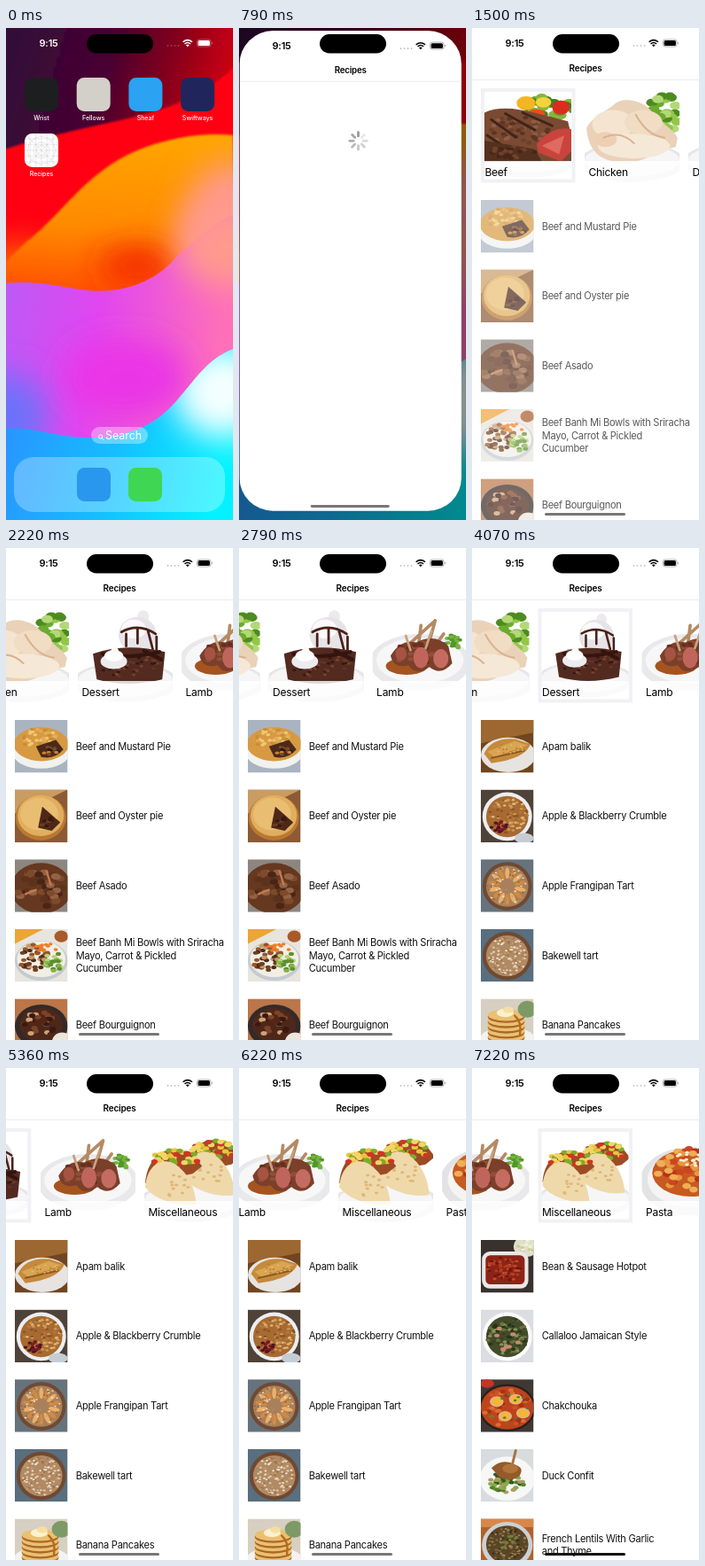
Write an HTML page that moves like this. It is 256 px wide and 555 px high and loops after 8 s.

```html
<!DOCTYPE html>
<html lang="en">
<head>
<meta charset="utf-8">
<title>Recipes</title>
<style>
html, body { margin: 0; height: 100%; overflow: hidden; background: #fff; }
svg { display: block; }
#stage { width: 100vw; height: 100vh; }
text { font-family: Inter, Roboto, sans-serif; }
.row { font-size: 11.07px; letter-spacing: -.27px; fill: #111; }
.cat { font-size: 12px; letter-spacing: -.26px; }
.app { font-size: 7px; font-weight: 500; fill: #fff; text-anchor: middle; }
</style>
</head>
<body>
<svg id="stage" viewBox="0 0 256 555" preserveAspectRatio="none">
  <defs>
    <linearGradient id="dark" x2="1" y2=".15"><stop stop-color="#2e0a3a"/><stop offset=".5" stop-color="#4a0430"/><stop offset=".75" stop-color="#86041c"/><stop offset="1" stop-color="#cc0410"/></linearGradient>
    <linearGradient id="flame" x1=".4" x2=".3" y2="1"><stop stop-color="#ffa400"/><stop offset=".55" stop-color="#ff8a00"/><stop offset="1" stop-color="#ff4800"/></linearGradient>
    <linearGradient id="violet" y2=".2"><stop stop-color="#b95cf6"/><stop offset=".45" stop-color="#e046f0"/><stop offset="1" stop-color="#ff70b8"/></linearGradient>
    <linearGradient id="ice" y1=".3" x2="1" y2=".5"><stop stop-color="#2a92ff"/><stop offset=".5" stop-color="#16bcff"/><stop offset="1" stop-color="#04f2ff"/></linearGradient>
    <filter id="soft" x="-100%" y="-100%" width="300%" height="300%"><feGaussianBlur stdDeviation="18"/></filter>
    <filter id="edge"><feGaussianBlur stdDeviation="1"/></filter>
    <clipPath id="clip"><rect id="win"/></clipPath>
    <clipPath id="shore"><path id="wave" d="M256 362C226 374 214 396 192 421C164 453 128 464 88 462C50 460 30 450 0 452V555H256Z"/></clipPath>
  </defs>
  <g id="wall">
    <path d="M0 0H256V555H0Z" fill="#ff0012"/>
    <path d="M-5-5H262V40C228 72 196 88 142 101C92 113 45 121-5 138Z" fill="url(#dark)" filter="url(#edge)"/>
    <ellipse cx="15" cy="275" rx="55" ry="30" fill="#ff6a00" filter="url(#soft)"/>
    <path d="M22 242C62 212 90 162 148 138C188 122 225 118 256 121V310H0V264Z" fill="url(#flame)" filter="url(#edge)"/>
    <ellipse cx="256" cy="225" rx="56" ry="75" fill="#ff9a8c" filter="url(#soft)"/>
    <ellipse cx="148" cy="268" rx="44" ry="20" fill="#f42400" filter="url(#soft)"/>
    <path d="M0 288C35 284 60 292 92 296C135 300 172 284 194 256C215 238 235 220 256 210V555H0Z" fill="url(#violet)"/>
    <ellipse cx="250" cy="245" rx="58" ry="48" fill="#ff9a8e" filter="url(#soft)"/>
    <ellipse cx="135" cy="395" rx="70" ry="45" fill="#ea34e6" filter="url(#soft)"/>
    <ellipse cx="0" cy="440" rx="45" ry="50" fill="#6a72fa" filter="url(#soft)"/>
    <use href="#wave" fill="url(#ice)"/>
    <g clip-path="url(#shore)"><ellipse cx="244" cy="410" rx="55" ry="52" fill="#f4ffff" filter="url(#soft)"/></g>
  </g>
  <rect id="dim" width="256" height="555"/>
  <g id="home"></g>
  <g clip-path="url(#clip)">
    <g id="app">
      <rect width="256" height="560" fill="#fff"/>
      <g id="lists"></g>
      <g id="cards"></g>
      <g id="spin"></g>
      <path d="M0 58.5H256" stroke="#e4e4e6" stroke-width=".7"/>
      <text x="128" y="48.7" text-anchor="middle" font-size="10" font-weight="600" letter-spacing="-.2">Recipes</text>
      <rect id="bar" x="82" y="547" width="91" height="3" rx="1.5"/>
    </g>
    <g id="icon"></g>
  </g>
  <rect x="91" y="7" width="75" height="21.5" rx="10.75"/>
  <g id="status">
    <text x="37.5" y="21" font-size="11" font-weight="600" letter-spacing="-.2">9:15</text>
    <path d="M182.5 20h.01m4 0h.01m4 0h.01m4 0h.01" stroke="currentColor" stroke-width="1.6" stroke-linecap="round" opacity=".35"/>
    <path d="M199.6 15.8q5.2-4.4 10.4 0M201.5 17.8q3.3-2.7 6.6 0" fill="none" stroke="currentColor" stroke-width="1.5"/>
    <path d="M202.9 19.2q1.9-1.4 3.8 0l-1.9 2z"/>
    <rect x="215.5" y="13" width="15.5" height="8" rx="2.5" fill="none" stroke="currentColor" stroke-width=".7" opacity=".45"/>
    <rect x="216.6" y="14.1" width="13.3" height="5.8" rx="1.5"/>
    <path d="M232 15.5q1.8 1.5 0 3z" opacity=".5"/>
  </g>
</svg>
<script>
const $ = id => document.getElementById(id);
const set = (el, attrs) => { for (const k in attrs) el.setAttribute(k, attrs[k]); };
const clamp = v => Math.max(0, Math.min(1, v));

// Drawing helpers; food pictures use a 100 x 100 box
let seed = 7;
const rnd = () => (seed = seed * 16807 % 2147483647) / 2147483647;
const E = (x, y, rx, ry, f) => `<ellipse cx="${x}" cy="${y}" rx="${rx}" ry="${ry}" fill="${f}"/>`;
const R = (x, y, w, h, f, r = 0) => `<rect x="${x}" y="${y}" width="${w}" height="${h}" rx="${r}" fill="${f}"/>`;
const P = (d, f) => `<path d="${d}" fill="${f}"/>`;
const S = (d, c, w) => `<path d="${d}" fill="none" stroke="${c}" stroke-width="${w}" stroke-linecap="round"/>`;
const bg = f => R(0, 0, 100, 100, f);
const bits = (n, x, y, rx, ry, size, ...cols) => {
  let s = '';
  for (let i = 0; i < n; i++) {
    const a = rnd() * 6.283, d = Math.sqrt(rnd());
    s += E((x + rx * d * Math.cos(a)).toFixed(1), (y + ry * d * Math.sin(a)).toFixed(1), size, size * .7, cols[i % cols.length]);
  }
  return s;
};
const pic = (art, x, y, w) => `<svg x="${x}" y="${y}" width="${w}" height="${w}" viewBox="0 0 100 100">${art}</svg>`;

const plate = E(50, 78, 56, 21, '#e6e6e8') + E(50, 76, 50, 17, '#f6f6f7');
const taco = (x, y) => `<g transform="translate(${x} ${y})">` +
  P('M0 40C2 8 30-6 52 12L60 22L50 30Z', '#9c4b24') + bits(40, 32, 15, 25, 10, 3.5, '#e8c53c', '#7faa2e', '#cf3526', '#f0d668') +
  P('M0 44C2 18 20 12 32 20C46 30 52 44 54 62C38 66 10 58 0 44Z', '#efd9ab') + bits(12, 28, 43, 19, 14, 2, '#ddb878') + '</g>';

const cats = [
  ['Beef', bg('#fff') + plate + bits(24, 70, 20, 34, 14, 7, '#5d9a2c', '#3f7d22', '#86b53c') +
    E(48, 13, 11, 8, '#f5b422') + E(68, 12, 9, 6, '#f6d23c') + E(88, 18, 10, 8, '#dc2c20') + E(60, 25, 10, 5, '#e8501e') +
    P('M0 24C25 12 60 25 96 34L100 50V80H0Z', '#7a4a32') + bits(50, 38, 44, 36, 16, 3, '#8f5d43', '#5d3422', '#6d3f2a') +
    S('M8 32L36 52M24 25L58 44M44 24L78 39M3 50L24 64', '#40241a', 3) +
    P('M0 56L58 66L66 80H0Z', '#54301f') + bits(24, 30, 70, 28, 7, 3, '#6f422c', '#472619') +
    P('M60 60C72 45 88 40 100 43V68L88 80L62 70Z', '#c8443c') + P('M66 62L92 50L86 72Z', '#e06a60')],
  ['Chicken', bg('#fff') + plate + bits(30, 84, 27, 17, 20, 6, '#6cab2d', '#92c748', '#4d8b20', '#b4d878') +
    P('M2 42C8 30 20 26 30 18C40 8 62 12 72 26C82 38 92 42 98 52L96 62C70 66 70 78 42 78C16 78 4 66 2 42Z', '#e9d2b8') +
    E(30, 38, 22, 15, '#f4e4d0') + E(62, 36, 20, 13, '#f1dcc4') + E(52, 61, 38, 13, '#f6e8d6') + E(22, 54, 12, 8, '#efcfb4') +
    S('M20 52Q38 44 52 58M54 28Q66 50 84 52', '#dab491', 2)],
  ['Dessert', bg('#fff') + plate + E(69, 9, 6, 7, '#eceaec') + E(63, 28, 20, 19, '#e6e4e8') + E(59, 22, 13, 10, '#fafafa') +
    S('M46 25Q64 15 82 27M51 27V40M63 22V37M74 24L79 43M83 30V49', '#4a2118', 2.6) +
    P('M16 48Q50 36 92 46L89 75Q52 84 20 75Z', '#532a20') + bits(46, 55, 61, 33, 12, 2, '#74432f', '#361813', '#633525') +
    S('M26 48Q52 54 86 46M70 45L88 54', '#35140f', 4) + E(38, 56, 14, 8, '#ecebee') + E(38, 50, 10, 6, '#fff') + E(39, 45, 4, 4, '#fafafa')],
  ['Lamb', bg('#fff') + E(50, 57, 53, 30, '#e9e9ec') + E(50, 55, 46, 24, '#f7f7f8') + E(36, 61, 22, 9, '#a5541f') +
    bits(26, 84, 36, 9, 8, 2.6, '#4f9828', '#78b242') + S('M36 40L66 13M48 43L51 18M59 38L66 13M66 39L75 27', '#b48a62', 3.4) +
    P('M19 50Q30 32 46 36Q66 26 80 40L84 58Q72 72 60 62Q46 72 38 60Q22 64 19 50Z', '#7b3f2a') + bits(24, 50, 48, 28, 12, 3, '#8f5038', '#663020') +
    E(51, 52, 8, 11, '#c0655c') + E(72, 53, 8, 10, '#c46c62') + E(30, 48, 6, 7, '#a55343') + S('M40 44L35 29M56 42L62 24', '#c8a27d', 2.6)],
  ['Miscellaneous', bg('#fff') + plate + taco(42, 8) + taco(1, 18)],
  ['Pasta', bg('#fff') + E(52, 56, 54, 36, '#e3e3e6') + E(52, 54, 46, 29, '#f5f4f3') + E(52, 47, 41, 25, '#c65a20') +
    bits(60, 52, 43, 36, 22, 4.5, '#e9983f', '#cc4520', '#efae58', '#b93118') + bits(16, 50, 32, 17, 8, 2, '#fff1d8')],
];

const dish = (back, rim, fill) => bg(back) + E(50, 51, 47, 46, rim) + E(50, 51, 40, 39, fill);
const slices = () => {
  let s = '';
  for (let i = 0; i < 14; i++) s += `<g transform="rotate(${i * 25.7} 50 51)">${E(50, 26, 4, 11, i % 2 ? '#d08a42' : '#ebb068')}</g>`;
  return s;
};
const lists = [
  [
    ['Beef and Mustard Pie', bg('#a9b4c0') + E(50, 62, 54, 30, '#f1f1ef') + E(50, 46, 52, 32, '#d79a42') + bits(46, 46, 36, 38, 20, 4, '#f0c771', '#e3ad57', '#c98d38') + P('M40 50L78 38L92 56Q75 76 50 70Z', '#4b2a1a') + bits(16, 68, 58, 16, 9, 4, '#7b4a2a', '#c9842f', '#2f1a12')],
    ['Beef and Oyster pie', bg('#8c5a34') + P('M0 0H100L75 12L0 45Z', '#c99c63') + E(49, 53, 48, 43, '#b97932') + E(49, 49, 44, 39, '#e0ae5e') + E(46, 46, 36, 31, '#e9bd72') + P('M52 32L86 62L70 78L44 72Z', '#4d2819') + bits(12, 62, 62, 14, 10, 4, '#6b3b22', '#38190f')],
    ['Beef Asado', bg('#8d8680') + E(50, 55, 58, 48, '#65381f') + bits(40, 50, 54, 46, 36, 8, '#4a2415', '#7d4b2b', '#5c321d', '#936243') + S('M60 22L68 48M20 66L40 58', '#c27a50', 4)],
    ['Beef Banh Mi Bowls with Sriracha|Mayo, Carrot & Pickled|Cucumber', bg('#e8e4de') + P('M0 0H55L0 28Z', '#eda439') + E(50, 60, 50, 38, '#c5cad0') + E(50, 57, 46, 34, '#f1eee6') + bits(50, 36, 54, 28, 26, 5, '#70401f', '#965529', '#4e2b17', '#c79a6c') + bits(24, 74, 62, 18, 18, 5, '#83b244', '#b7d477', '#5d8f30') + bits(12, 60, 36, 21, 8, 4, '#ee7c26') + E(88, 14, 13, 11, '#a85a28')],
    ['Beef Bourguignon', bg('#bb7649') + E(50, 52, 50, 41, '#332a28') + E(50, 50, 41, 32, '#4d281a') + bits(32, 48, 48, 32, 25, 6, '#7b4328', '#cba47b', '#552515', '#3a1a10') + E(90, 83, 20, 19, '#ece6dd')],
  ],
  [
    ['Apam balik', bg('#70451f') + P('M0 0H100V24L0 44Z', '#9c6730') + E(52, 66, 52, 33, '#e6e3e1') + P('M6 64Q20 32 66 36L94 46Q84 74 20 82Z', '#c58a3b') + P('M12 60L64 40L88 48L26 70Z', '#d9a552') + S('M20 72L82 58', '#8a5522', 3) + bits(18, 50, 56, 32, 10, 2, '#b67a32', '#e6bd70')],
    ['Apple & Blackberry Crumble', dish('#4f4238', '#eceef1', '#a76a31') + bits(90, 52, 48, 36, 34, 3, '#cf9a56', '#b67a39', '#dfb878', '#8a5426') + bits(18, 34, 70, 15, 12, 4, '#7b1b27', '#51121f') + E(82, 92, 18, 10, '#c6ccd4')],
    ['Apple Frangipan Tart', dish('#66737d', '#6f4a32', '#a9805c') + slices() + bits(60, 50, 51, 38, 37, 2, '#efe2d0', '#c79868', '#8d6240')],
    ['Bakewell tart', dish('#596e7e', '#6f4a32', '#b08a64') + bits(130, 50, 51, 38, 37, 2.4, '#e4cfb4', '#a0714a', '#f1e4d1', '#c39a6e')],
    ['Banana Pancakes', bg('#d7cfc1') + E(50, 76, 52, 22, '#f3f2f0') + [74, 64, 54, 44, 34].map(y => E(48, y, 35, 12, '#a9682b') + E(48, y - 3, 35, 11, '#ebc070')).join('') + E(46, 27, 16, 8, '#fbf0ce') + E(52, 21, 10, 6, '#f5dfa0') + S('M64 32Q78 44 74 68', '#b46a1f', 4) + E(88, 20, 18, 16, '#7d9a66')],
  ],
  [
    ['Bean & Sausage Hotpot', bg('#39312e') + E(86, 12, 24, 20, '#dfe0c6') + bits(14, 86, 12, 18, 12, 4, '#c9cf9c', '#f0efdc') + R(2, 22, 88, 70, '#e9e7e6', 15) + R(9, 29, 74, 55, '#8c2416', 9) + bits(70, 46, 56, 34, 24, 3.4, '#b33b22', '#6d170e', '#c24a30')],
    ['Callaloo Jamaican Style', dish('#dcdde0', '#fafafa', '#434b2a') + bits(100, 50, 50, 38, 36, 4, '#27341c', '#65733b', '#394522', '#8a9158') + bits(7, 50, 52, 27, 24, 5, '#ca8970')],
    ['Chakchouka', bg('#403833') + E(50, 54, 54, 45, '#25211f') + E(50, 54, 50, 41, '#bd431b') + bits(50, 50, 54, 44, 35, 5, '#cb5525', '#a23214', '#d86e35') + [[30, 42], [66, 38], [46, 70], [80, 64]].map(([x, y]) => E(x, y, 13, 10, '#e6b083') + E(x, y, 8, 7, '#f5b926')).join('') + bits(12, 50, 54, 40, 32, 3, '#587c2a') + E(12, 8, 13, 8, '#c83325')],
    ['Duck Confit', bg('#d8dcdf') + E(50, 56, 52, 42, '#f7f7f6') + bits(50, 50, 63, 33, 20, 5, '#55822b', '#86ad46', '#36591f', '#b09a67') + P('M20 36Q40 16 66 30Q84 36 72 52Q50 66 32 50Z', '#945a2b') + E(56, 37, 15, 9, '#b0743a') + S('M60 28L66 3', '#a87444', 5)],
    ['French Lentils With Garlic|and Thyme', bg('#b0622d') + R(0, 0, 100, 16, '#d8874a') + E(50, 50, 48, 44, '#ccd0d2') + E(50, 49, 40, 36, '#5a4528') + bits(110, 50, 49, 37, 33, 2.6, '#83673c', '#3c2e1b', '#a2854f') + bits(8, 50, 46, 24, 20, 4, '#6e7f39')],
  ],
];

$('lists').innerHTML = lists.map(list => '<g>' + list.map(([name, art], i) => {
  const y = 194 + i * 78.6, lines = name.replace('&', '&amp;').split('|');
  return pic(art, 10, y, 59.5) + lines.map((s, j) =>
    `<text class="row" x="78.7" y="${y + 33.8 + (j - (lines.length - 1) / 2) * 14.3}">${s}</text>`).join('');
}).join('') + '</g>').join('');

$('cards').innerHTML = cats.map(([name, art], i) =>
  `<g transform="translate(${10 + i * 117} 68)">${pic(art, 0, 0, 107)}${R(0, 82, 107, 25, '#ffffffd0')}` +
  `<rect x="2" y="2" width="102.5" height="102.5" fill="none" stroke="#f1f1f5" stroke-width="4"/>` +
  `<text class="cat" x="4.5" y="98.5">${name}</text></g>`).join('');

for (let i = 0; i < 8; i++)
  $('spin').innerHTML += `<path d="M137-5.5v-4.5" transform="translate(0 127) rotate(${i * 45} 137 0)" stroke="#98989c" stroke-width="2.8" stroke-linecap="round"/>`;

const tile = (x, y, f) => R(x, y, 38, 38, f, 8.5);
const label = (x, y, s) => `<text class="app" x="${x}" y="${y}">${s}</text>`;
const gridIcon = () => {
  let s = tile(0, 0, '#fff');
  for (const v of [6, 12.7, 19, 25.3, 32]) s += S(`M${v} 1V37M1 ${v}H37`, '#c8c8cc', .4);
  s += S('M3 3L35 35M35 3L3 35', '#c8c8cc', .4);
  for (const r of [5.5, 9, 15.5]) s += `<circle cx="19" cy="19" r="${r}" fill="none" stroke="#c0c0c4" stroke-width=".4"/>`;
  return s;
};
$('icon').innerHTML = gridIcon();
$('home').innerHTML =
  [['Wrist', '#1d1e20'], ['Fellows', '#d3d0c9'], ['Sheaf', '#2ba2f2'], ['Swiftways', '#20265c']].map(([s, f], i) =>
    tile(21 + i * 58.7, 56, f) + label(40 + i * 58.7, 103.5, s)).join('') +
  `<g transform="translate(21 119)">${gridIcon()}</g>` + label(40, 166.8, 'Recipes') +
  R(96, 450, 64, 19, '#ffffff58', 9.5) + S('M108.3 462.8l1.6 1.7', '#fff', .9) +
  '<circle cx="106.6" cy="461" r="2.1" fill="none" stroke="#fff" stroke-width=".9"/>' +
  '<text x="112" y="464.2" font-size="12.4" fill="#fff">Search</text>' +
  R(9, 484, 238, 62, '#ffffff48', 22) + tile(80, 496, '#2a97ee') + tile(138, 496, '#3fd653');

const step = 1000 / 7;
const ease = (t, start, tau, pow) => t < start ? 0 : 1 - Math.exp(-(((t - start) / tau) ** pow));
const fling = (t, start) => ease(t, start, 260, 1.4);
const settle = (t, start) => ease(t, start, 150, 1.5);
const picks = [[3500, 2], [6643, 4]];

function draw(time) {
  // The screen refreshes seven times a second
  const t = (Math.floor((time + 6) / step - .5) + .5) * step;

  // The icon grows into the app window
  let p = settle(t, 430);
  if (p > .99) p = 1;
  const q = 1 - p, x = 21 * q, y = 119 * q, w = 38 + 218 * p, h = 38 + 517 * p, k = w / 256, z = 1 + .08 * p;
  set($('win'), { x, y, width: w, height: h, rx: p === 1 ? 0 : 8.5 + 30 * p });
  set($('app'), { transform: `translate(${x} ${y}) scale(${k})`, opacity: clamp(p * 2) });
  set($('icon'), { transform: `translate(${x} ${y}) scale(${w / 38})`, opacity: p ? clamp(1 - p * 2) : 0 });
  set($('wall'), { transform: `translate(128 277) scale(${z}) translate(-128 -277)` });
  set($('dim'), { opacity: .45 * p });
  set($('home'), { opacity: clamp(1 - 1.3 * p) });
  const ink = p > .5 ? '#000' : '#fff';
  set($('status'), { transform: `translate(0 ${p > .5 ? y : 0})`, fill: ink, color: ink });
  set($('bar'), { fill: t < 6600 ? '#777' : '#111' });

  // Loading
  const shown = clamp((t - 928) / 400);
  const head = Math.round((t - 786) / 125);
  set($('spin'), { opacity: 1 - shown });
  [...$('spin').children].forEach((el, i) => set(el, { opacity: 1 - .11 * (((head - i) % 8 + 8) % 8) }));

  // Carousel
  const offset = 211 * fling(t, 1870) - 41.5 * settle(t, 3440) + 196.5 * fling(t, 5010) + 37.5 * settle(t, 6583);
  set($('cards'), { transform: `translate(${-offset} 0)`, opacity: shown });
  const chosen = picks.reduce((c, [s, i]) => t > s - 9 ? i : c, 0);
  [...$('cards').children].forEach((card, i) => {
    const on = i === chosen, size = on ? 98 : 107, pad = on ? 4 : 0;
    set(card.children[0], { x: pad, y: pad, width: size, height: size });
    set(card.children[2], { opacity: +on });
  });

  // Each choice fades the list over to the next one
  const first = t < 1900 ? Math.min(.7, clamp((t - 1214) / 400)) : 1;
  const out = s => clamp(1 - (t - s) / 290), into = s => clamp((t - s - 200) / 360);
  const [a, b] = [picks[0][0], picks[1][0]];
  const fades = [first * out(a), into(a) * out(b), into(b)];
  [...$('lists').children].forEach((g, i) => set(g, { opacity: fades[i], display: fades[i] ? 'inline' : 'none' }));
}

const begin = performance.now();
function tick() {
  draw((performance.now() - begin) % 8000);
  requestAnimationFrame(tick);
}
tick();
</script>
</body>
</html>
```
